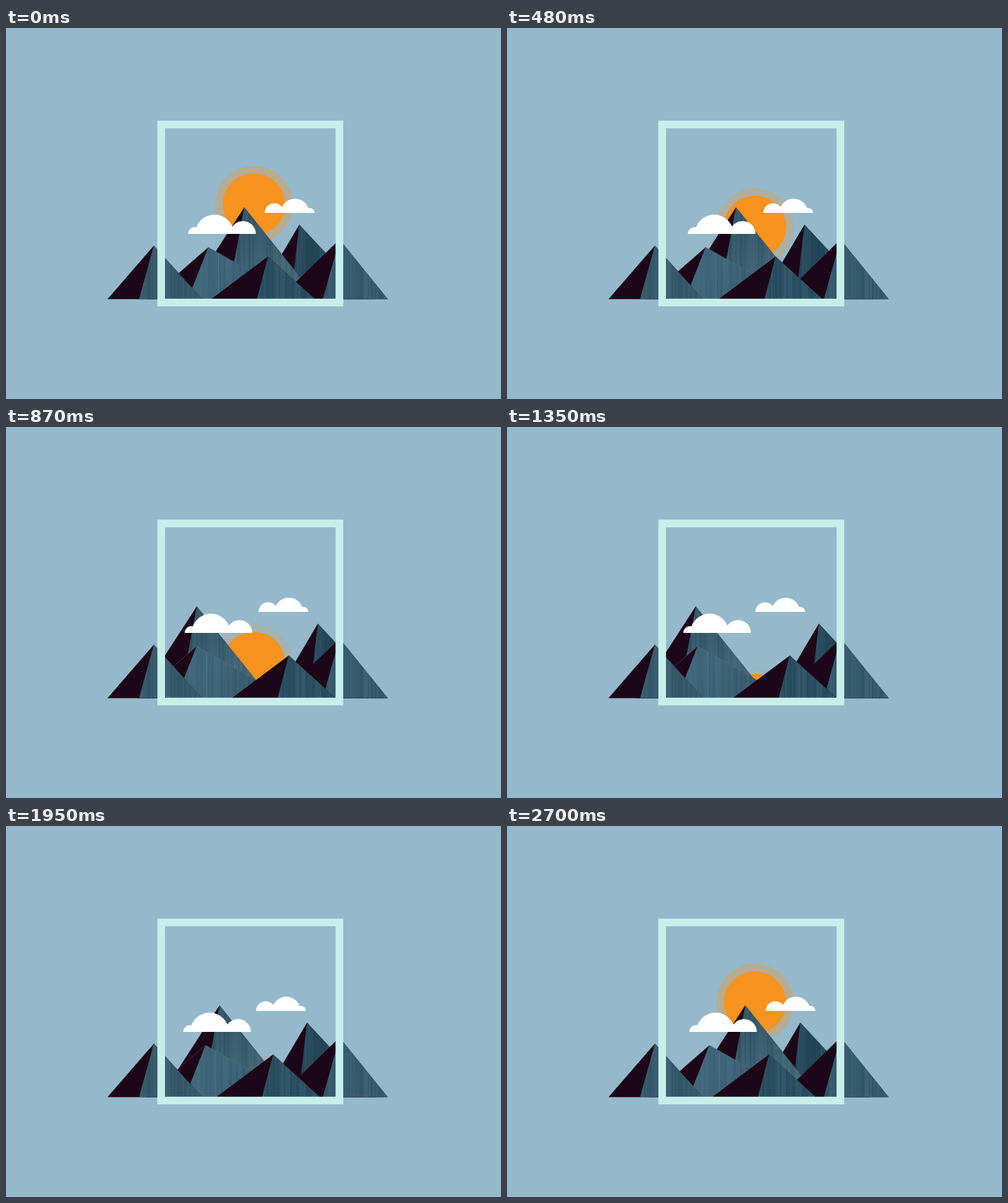
These frames come from a looping animation (800x600 px, 2790 ms). An HTML page with a canvas:

```html
<!DOCTYPE html>
<html lang="en">
<head>
<meta charset="utf-8">
<title>Mountain sunset</title>
<style>
html, body { margin: 0; width: 100%; height: 100%; overflow: hidden; background: #95b8cb; }
canvas { display: block; }
</style>
</head>
<body>
<canvas id="stage" width="800" height="600"></canvas>
<script>
const ctx = document.getElementById('stage').getContext('2d');
const LOOP = 2790, STEP = 30, BASE = 438.4;
const SKY = '#95b8cb', DARK = '#1d0618', SUN = '#f7931e';

// Foot offsets (left, ridge, right) are measured from the peak at the base line.
const mountains = [
  { x: 474, y: 318, feet: [-71, -14, 112], shift: 30, duration: 585, light: '#28495b', grain: 0.17, seed: 11 },
  { x: 385, y: 290, feet: [-96, -27.5, 119], shift: -80, duration: 650, light: '#34586a', fade: '#496b7b', grain: 0.13, seed: 23 },
  { x: 327, y: 354.5, feet: [-96, -33, 147], shift: -19, duration: 480, light: '#41667a', fade: '#36596a', grain: 0.1, seed: 37, rim: true },
  { x: 539, y: 342, feet: [-99, -27, 78], shift: 0, duration: 1, light: '#365a6c', grain: 0.13, seed: 41 },
  { x: 423.5, y: 369.5, feet: [-92, -18, 76], shift: 33.5, duration: 480, light: '#2b4f62', grain: 0.15, seed: 59 },
  { x: 239, y: 352, feet: [-75, -24, 78], shift: 0, duration: 1, light: '#375b6c', grain: 0.13, seed: 67 }
];

// Bumps are [center x, radius], sitting on a flat base.
const clouds = [
  { base: 333, shift: -10.3, bumps: [[305.5, 11], [337, 31.2], [383, 20.8]] },
  { base: 299, shift: -18, bumps: [[433.7, 15.5], [467, 23], [490.5, 8]] }
];

function seeded(seed) {
  return () => {
    seed = (seed * 16807) % 2147483647;
    return seed / 2147483647;
  };
}

function makeGrain({ seed, grain, feet }) {
  const random = seeded(seed * 7919);
  const strips = [];
  for (let x = feet[1] - 2; x < feet[2];) {
    const width = 1 + random() * 3;
    const tone = random() - 0.5;
    strips.push({ x, width, color: tone < 0 ? '#0d2636' : '#7898a6', alpha: Math.abs(tone) * grain * 2 });
    x += width;
  }
  return strips;
}
mountains.forEach(m => { m.strips = makeGrain(m); });

function ease(time, start, end) {
  const u = Math.min(1, Math.max(0, (time - start) / (end - start)));
  return u * u * (3 - 2 * u);
}

function thereAndBack(time, outStart, outEnd, backStart, backEnd) {
  return ease(time, outStart, outEnd) - ease(time, backStart, backEnd);
}

function polygon(points, fill) {
  ctx.beginPath();
  points.forEach(([x, y]) => ctx.lineTo(x, y));
  ctx.closePath();
  ctx.fillStyle = fill;
  ctx.fill();
}

function disc(x, y, radius, fill) {
  ctx.beginPath();
  ctx.arc(x, y, radius, 0, Math.PI * 2);
  ctx.fillStyle = fill;
  ctx.fill();
}

function drawSun(time) {
  const drop = time < 1650 ? ease(time, 0, 1680) : 1 - ease(time, 1625, 2700);
  const y = 285.5 + 182 * drop;
  ctx.save();
  ctx.beginPath();
  ctx.rect(250, 156, 290, 288);
  ctx.clip();
  ctx.globalAlpha = 0.33 * (1 - drop);
  disc(400.7, y, 62.5, SUN);
  ctx.globalAlpha = 1;
  disc(400.7, y, 50.3, SUN);
  ctx.restore();
}

function drawMountain(m, time) {
  const moved = thereAndBack(time, 300, 300 + m.duration, 1625, 1625 + m.duration);
  const [left, ridge, right] = m.feet;
  const foot = BASE - m.y;
  ctx.save();
  ctx.translate(m.x + m.shift * moved, m.y);
  polygon([[0, 0], [left, foot], [right, foot]], DARK);

  const shade = ctx.createLinearGradient(0, 0, right, foot);
  shade.addColorStop(0.2, m.light);
  shade.addColorStop(0.8, m.fade || m.light);
  polygon([[0, 0], [ridge, foot], [right, foot]], shade);
  if (m.rim) {
    ctx.beginPath();
    ctx.moveTo(left, foot);
    ctx.lineTo(0, 0);
    ctx.lineTo(right, foot);
    ctx.strokeStyle = 'rgba(150, 175, 185, 0.35)';
    ctx.lineWidth = 0.8;
    ctx.stroke();
  }
  ctx.beginPath();
  ctx.moveTo(0, 0);
  ctx.lineTo(ridge, foot);
  ctx.lineTo(right, foot);
  ctx.clip();
  for (const { x, width, color, alpha } of m.strips) {
    ctx.globalAlpha = alpha;
    ctx.fillStyle = color;
    ctx.fillRect(x, 0, width, foot);
  }
  if (m.rim) {
    ctx.globalAlpha = 0.25;
    ctx.fillStyle = '#9ab5c0';
    ctx.fillRect(16, 0, 1, foot);
  }
  ctx.restore();
}

function drawCloud({ base, shift, bumps }, time) {
  const dx = shift * thereAndBack(time, 0, 1620, 1620, 2700);
  ctx.fillStyle = '#fff';
  ctx.beginPath();
  for (const [x, radius] of bumps) {
    ctx.moveTo(x + dx - radius, base);
    ctx.arc(x + dx, base, radius, Math.PI, 0);
  }
  ctx.fill();
}

function draw(time) {
  ctx.fillStyle = SKY;
  ctx.fillRect(0, 0, 800, 600);
  drawSun(time);
  mountains.forEach(m => drawMountain(m, time));
  ctx.strokeStyle = '#c9eeea';
  ctx.lineWidth = 12.4;
  ctx.strokeRect(250.8, 156, 288, 288);
  clouds.forEach(c => drawCloud(c, time));
}

const start = performance.now();
function tick() {
  const elapsed = (performance.now() - start) % LOOP;
  draw(Math.floor(elapsed / STEP) * STEP);
  requestAnimationFrame(tick);
}
tick();
</script>
</body>
</html>
```
